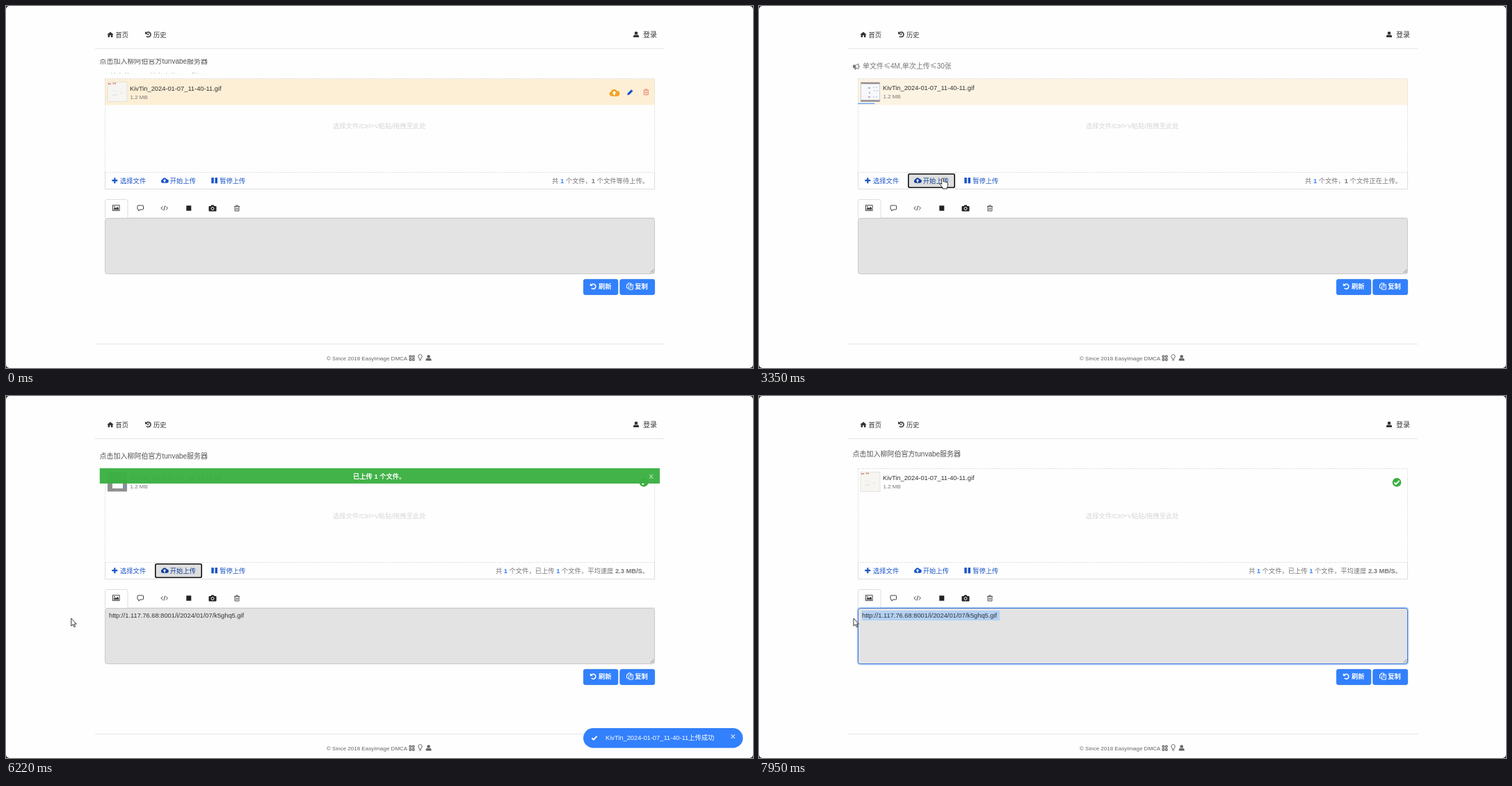
Recreate the animation shown at these times as an HTML page. Size 1074 px wide and 521 px high, loop 8000 ms.

```html
<!DOCTYPE html>
<html lang="zh-CN">
<head>
<meta charset="utf-8">
<title>Upload demo</title>
<style>
html, body { margin: 0; width: 100%; height: 100%; overflow: hidden; background: #2b2b2b; }
svg { display: block; width: 1074px; height: 521px; }
text { font: 9.3px "Liberation Sans", "Noto Sans CJK SC", "Noto Sans CJK", sans-serif; fill: #333; white-space: pre; }
.t10 { font-size: 10px; }
.t8 { font-size: 8px; }
.cjk { font-family: "Noto Sans CJK SC", "Noto Sans CJK", sans-serif; }
.muted { fill: #777; }
.blue { fill: #1a55c8; }
.b { font-weight: 700; }
.num { font-weight: 700; fill: #3280fc; }
.white { fill: #fff; }
.line { fill: none; stroke: #ddd; }
.dash { fill: none; stroke: #ddd; stroke-dasharray: 2 1.5; }
.ico { fill: none; stroke: #444; }
</style>
</head>
<body>
<svg viewBox="0 0 1074 521">
  <defs>
    <clipPath id="tickerClip"><rect x="130" y="76" width="400" height="20.7"/></clipPath>
    <clipPath id="bannerClip"><rect id="bannerBox" x="134.5" y="104" width="805.5" height="0"/></clipPath>
    <g id="user"><circle cy="-2" r="2.3"/><path d="M-4 4V2.6Q-4 .4-1.8 .2Q0 1.4 1.8 .2Q4 .4 4 2.6V4Z"/></g>
    <g id="cloud">
      <path d="M-2.8 4A2.7 2.7 0 0 1-3.3-1.2A3.4 3.4 0 0 1 3-1.6A2.8 2.8 0 0 1 3 4Z"/>
      <path d="M0-1.8L2.3 .7H.8V3H-.8V.7H-2.3Z" fill="#fff"/>
    </g>
    <g id="undo">
      <path d="M-2.8-2A3.5 3.5 0 1 1-2.6 2.4" fill="none" stroke="currentColor" stroke-width="1.5"/>
      <path d="M-4.5-4.5V-.5H-.5Z" fill="currentColor"/>
    </g>
    <path id="bin" d="M-4-2.5H4M-1.4-2.7V-4H1.4V-2.7M-3-2.4V4H3V-2.4M-1-.8V2.6M1-.8V2.6" fill="none" stroke="currentColor"/>
    <path id="tick" d="M-3.6 .2L-1.2 2.6 3.6-2.4" fill="none" stroke="#fff" stroke-width="2"/>
  </defs>

  <rect width="1074" height="521" rx="5" fill="#fefefe"/>

  <!-- header -->
  <path d="M145.3 41.3L150 37.2 154.7 41.3H153.4V45H151V42.3H149V45H146.6V41.3Z" fill="#333"/>
  <text x="157.5" y="44.5">首页</text>
  <use href="#undo" x="204.5" y="41" color="#333"/>
  <path class="ico" d="M204.8 39V41.5H203"/>
  <text x="212" y="44.5">历史</text>
  <use href="#user" x="906" y="41" fill="#333"/>
  <text class="t10" x="916" y="44.7">登录</text>
  <path class="line" d="M128 61.5H947M128 486.5H947" style="stroke:#e5e5e5"/>

  <g clip-path="url(#tickerClip)"><g id="ticker"></g></g>

  <!-- uploader -->
  <rect id="row" x="142" y="105" width="791" height="37.5" fill="#fdefd5"/>
  <path class="dash" d="M142 104.5H933M142.5 105V240M932.5 105V240M142 239.5H933"/>
  <path class="line" d="M142.5 240V263.5H932.5V240"/>
  <g id="thumb">
    <g id="thumbBlank">
      <rect x="146" y="109.5" width="28" height="28" fill="#f6f5f1" stroke="#e2dfd8" stroke-width=".8"/>
      <path d="M147 112H151M153.5 111.5H158" stroke="#d9867d" stroke-width="2.2" stroke-dasharray="2 .6"/>
      <path id="thumbMark" d="M153 122H155M157 123H159M152 128H160M164 125H167" stroke="#cfd8e2" stroke-width=".8"/>
    </g>
    <g id="thumbWindow">
      <rect x="146" y="109.5" width="28" height="28" fill="#f7f8fb"/>
      <path d="M146 111H174M146 136.5H174" stroke="#938d8f" stroke-width="2.6"/>
      <path d="M146.4 110V137M173.6 110V137" stroke="#bbb" stroke-width=".8"/>
      <path d="M164 117H172M165 122H172M164 131H171" stroke="#8fbbe8" stroke-dasharray="2 2"/>
      <path id="thumbDots" d="M155 118H158M156 125H158M155 131H158" stroke="#b98b95" stroke-width="1.3"/>
    </g>
    <g id="thumbDark">
      <rect x="146" y="109.5" width="28" height="28" fill="#8f9090"/>
      <rect x="153" y="124" width="15" height="9" fill="#fff"/>
      <path d="M168 131H172" stroke="#4f97fe" stroke-width="1.4"/>
      <path d="M147 112H173" stroke="#aaa"/>
    </g>
  </g>
  <g id="fileText">
    <text x="178" y="121.7">KivTin_2024-01-07_11-40-11.gif</text>
    <text class="t8 muted" x="178.5" y="134">1.2 MB</text>
  </g>
  <g id="rowIcons">
    <use href="#cloud" transform="translate(874.5 124.5) scale(1.35)" fill="#f1a325"/>
    <path d="M893.2 128.2L893.8 125.4 899 120.2 901.4 122.6 896.1 127.7Z" fill="#1a55c8"/>
    <use href="#bin" x="920.3" y="123.8" color="#ea8573"/>
  </g>
  <rect id="progress" x="142" y="139.7" height="1.4" fill="#65a2fd"/>
  <g id="check">
    <circle cx="917" cy="124.3" r="6.2" fill="#b9b09c"/>
    <circle id="checkGreen" cx="917" cy="124.3" r="6.2" fill="#38b03f"/>
    <use href="#tick" x="917" y="124.3"/>
  </g>
  <text x="470" y="176.3" style="fill:#d5d5d5">选择文件/Ctrl+V粘贴/拖拽至此处</text>

  <rect id="startBg" x="213" y="240" width="70" height="23" fill="#dfdfdf"/>
  <rect id="pauseBg" x="286" y="240" width="67.5" height="23" fill="#ebebeb"/>
  <g id="focusRing" fill="none">
    <rect x="213.4" y="240.4" width="69.2" height="22.2" rx="2.5" stroke="#fefefe" stroke-width="1.2"/>
    <rect x="214.8" y="241.8" width="66.4" height="19.4" rx="2" stroke="#111" stroke-width="1.6"/>
  </g>
  <path d="M152.3 251.2H160.3M156.3 247.2V255.2" stroke="#1a55c8" stroke-width="2.2"/>
  <text class="blue" x="164" y="254.6">选择文件</text>
  <g id="startLabel" class="blue"><use href="#cloud" x="228" y="250.8"/><text x="235.8" y="254.6" style="fill:inherit">开始上传</text></g>
  <g id="pauseLabel" class="blue"><path d="M295.3 247H298.8V255.2H295.3ZM300.5 247H304V255.2H300.5Z"/><text x="307.2" y="254.6" style="fill:inherit">暂停上传</text></g>
  <g text-anchor="end">
    <text id="waiting" class="muted" x="924" y="254.6">共 <tspan class="num">1</tspan> 个文件，<tspan class="b">1</tspan> 个文件等待上传。</text>
    <text id="sending" class="muted" x="924" y="254.6">共 <tspan class="num">1</tspan> 个文件，<tspan class="b">1</tspan> 个文件正在上传。</text>
    <text id="done" class="muted" x="924" y="254.6">共 <tspan class="num">1</tspan> 个文件，已上传 <tspan class="num">1</tspan> 个文件，平均速度 <tspan class="b">2.3 MB/S</tspan>。</text>
  </g>

  <!-- tabs -->
  <path class="line" d="M142.5 305V281Q142.5 278.5 145 278.5H172.5Q175 278.5 175 281V305H933"/>
  <rect class="ico" x="153.5" y="286.8" width="9.6" height="7.6"/>
  <path d="M154.8 293.2V291.5L156.8 289.8 158.3 291 160.3 288.8 162 291V293.2Z" fill="#444"/><circle cx="156" cy="288.8" r=".9" fill="#444"/>
  <path class="ico" d="M190 287H196.5Q197.5 287 197.5 288V292Q197.5 293 196.5 293H193L190.8 295V293H190Q189 293 189 292V288Q189 287 190 287Z"/>
  <path class="ico" d="M225.5 288.3L222.8 291 225.5 293.7M229.8 288.3L232.5 291 229.8 293.7M228.5 287.6L226.8 294.4"/>
  <rect x="259.3" y="287.3" width="7" height="7.4" fill="#222"/>
  <path d="M292.5 288H294.5L295.3 286.5H298.7L299.5 288H301.5Q302.5 288 302.5 289V294.5Q302.5 295.5 301.5 295.5H292.5Q291.5 295.5 291.5 294.5V289Q291.5 288 292.5 288Z" fill="#222"/>
  <circle cx="297" cy="291.5" r="2" fill="#222" stroke="#fff"/>
  <use href="#bin" x="332" y="291" color="#555"/>

  <!-- result box -->
  <g id="halo" fill="none" stroke="#3280fc">
    <rect x="141.5" y="304.5" width="792" height="82" rx="4" opacity=".28"/>
    <rect x="140.5" y="303.5" width="794" height="84" rx="5" opacity=".12"/>
  </g>
  <rect x="142.5" y="305.5" width="790" height="80" rx="3" fill="#e3e3e3" stroke="#c9c9c9"/>
  <rect id="focusLine" x="142.5" y="305.5" width="790" height="80" rx="3" fill="none" stroke="#3474dc"/>
  <path d="M926.5 384L931.5 379M929.5 384L931.5 382" stroke="#777" stroke-width=".8"/>
  <rect id="selection" y="309" height="14" fill="#b3d1f4"/>
  <text id="url" x="148" y="319.2">http://1.117.76.68:8001/i/2024/01/07/k5ghq5.gif</text>

  <rect x="830.4" y="393.4" width="49.4" height="22" rx="2.5" fill="#3280fc" stroke="#2474ee" stroke-width=".8"/>
  <rect x="882.8" y="393.4" width="49.8" height="22" rx="2.5" fill="#3280fc" stroke="#2474ee" stroke-width=".8"/>
  <use href="#undo" x="844.3" y="403.6" color="#fff"/>
  <text class="white b" x="852" y="407">刷新</text>
  <path d="M894.5 401V399H898.5V405.5M894.5 401H892.5V406H895.5M895.7 402.3L897 401H901.3V408H895.7Z" fill="none" stroke="#fff"/>
  <text class="white b" x="904.3" y="407">复制</text>

  <!-- footer -->
  <text class="t8" x="461" y="509.7" style="fill:#666">© Since 2018 EasyImage DMCA</text>
  <path class="ico" d="M580 503.2H582.6V505.8H580ZM584.4 503.2H587V505.8H584.4ZM580 507.6H582.6V510.2H580ZM584.4 507.6H587V510.2H584.4Z"/>
  <path class="ico" d="M594.3 508.3Q594.3 507 593.4 506A2.7 2.7 0 1 1 597.6 506Q596.7 507 596.7 508.3ZM594.2 510H596.8" style="stroke:#666"/>
  <use href="#user" x="607.6" y="506.5" fill="#666"/>

  <!-- notices -->
  <g clip-path="url(#bannerClip)">
    <rect x="134.5" y="104" width="806" height="22" fill="#3bb042" opacity=".96"/>
    <text class="white b" x="499" y="118.6">已上传 1 个文件。</text>
    <text class="b" x="924.6" y="118.6" style="fill:#b4dfb7">X</text>
  </g>
  <g id="toast">
    <rect x="830" y="478" width="229.5" height="28.5" rx="14.2" fill="#3280fc"/>
    <use href="#tick" x="846" y="492"/>
    <text class="white" x="862" y="495.2">KivTin_2024-01-07_11-40-11上传成功</text>
    <path d="M1042.5 487.3L1047.9 492.7M1047.9 487.3L1042.5 492.7" stroke="#c4dbfe" stroke-width="1.3"/>
  </g>

  <g id="cursor" stroke="#222" stroke-width=".9" fill="#fff" stroke-linejoin="round">
    <path id="arrow" d="M0 0V11L2.5 8.7 4.2 12.6 5.9 11.8 4.2 8.1H7.5Z"/>
    <path id="hand" d="M-1.3 .6Q0-1 1.3 .6V5Q2.6 4.4 3.6 5.4Q5 4.9 5.9 6Q7.4 5.8 7.5 7.4V10.5Q7.3 12.5 6.2 13V15H0V13.5L-3.8 8.8Q-4 7-2.6 7.4L-1.3 8.6Z"/>
  </g>
</svg>
<script>
const LOOP = 8000, LINE = 21.5, BANNER = 22;
const $ = Object.fromEntries([...document.querySelectorAll('[id]')].map(e => [e.id, e]));

const invite = '<text class="t10" style="fill:#555" x="134.5" y="0">点击加入柳阿伯官方tunvabe服务器</text>';
const limits = '<path d="M135.5-5H139L143-7V.5L139-1.5H135.5ZM137-1.5L138 1H139.5L138.6-1.5M144-4.5V-2" fill="none" stroke="#777"/>' +
  '<path d="M135.5-5H139V-1.5H135.5Z" fill="#777"/>' +
  '<text class="t10 muted" x="149" y="0">单文件<tspan class="cjk">≤</tspan>4M,单次上传<tspan class="cjk">≤</tspan>30张</text>';
$.ticker.innerHTML = [invite, limits, invite, limits]
  .map((line, i) => `<g transform="translate(0 ${i * LINE})">${line}</g>`).join('');

// time, x, y
const path = [
  [1430, 836, 240], [1650, 843, 285], [1750, 845, 298], [1900, 838, 262], [2090, 832, 230],
  [2230, 740, 236], [2370, 590, 242], [2700, 400, 246], [2950, 290, 250], [3150, 264, 248],
  [4300, 264, 248], [4600, 292, 254], [4750, 309, 259], [5000, 312, 259], [5150, 360, 257],
  [5250, 387, 256], [5450, 640, 290], [5690, 897, 385], [5780, 880, 386], [5840, 875, 385],
  [6050, 420, 352], [6220, 94, 320], [6350, 63, 316], [6500, 100, 322], [6680, 270, 330],
  [6850, 350, 326], [7020, 353, 325], [7300, 353, 325], [7700, 200, 322], [7900, 136, 320]
];

const ramp = (t, a, b) => Math.min(1, Math.max(0, (t - a) / (b - a)));
const swing = (t, a, b) => (1 - Math.cos(Math.PI * ramp(t, a, b))) / 2;
const show = (el, on) => el.setAttribute('opacity', +on);
const move = (el, x, y) => el.setAttribute('transform', `translate(${x} ${y})`);

function cursorAt(t) {
  const i = path.findIndex(k => k[0] > t);
  if (i < 1) return path[i < 0 ? path.length - 1 : 0].slice(1);
  const a = path[i - 1], b = path[i], p = ramp(t, a[0], b[0]);
  return [a[1] + (b[1] - a[1]) * p, a[2] + (b[2] - a[2]) * p];
}

function scrollAt(t) {
  const first = t < 730 ? .326 : .326 + .674 * Math.sin(ramp(t, 730, 1040) * Math.PI / 2);
  return first + swing(t, 4440, 4940) + swing(t, 7835, 8335);
}

function drawThumb(t) {
  const dark = t >= 4300 && t < 6800;
  const blank = t < 1000 || t >= 7520;
  show($.thumbBlank, blank);
  show($.thumbDark, dark);
  show($.thumbWindow, !dark && !blank);
  show($.thumbMark, t > 260 || Math.floor(t / 60) % 2 === 0 ? 1 : .6);
  move($.thumbDots, Math.floor(t / 300) % 3, 0);
}

function drawCursor(t) {
  const [x, y] = cursorAt(t);
  const inBar = t >= 1430 && y > 240 && y < 263;
  const onStart = inBar && x > 213 && x < 283;
  const onPause = inBar && x > 286 && x < 353.5;
  show($.cursor, t >= 1430);
  move($.cursor, x, y);
  show($.hand, onStart || onPause);
  show($.arrow, !onStart && !onPause);

  const focused = t >= 3270 && t < 6980;
  show($.focusRing, focused);
  show($.startBg, focused ? 1 : t >= 6980 ? 1 - ramp(t, 6980, 7180) : onStart ? .6 : 0);
  show($.pauseBg, onPause);
  $.startLabel.style.fill = focused || onStart ? '#123f96' : '';
  $.pauseLabel.style.fill = onPause ? '#123f96' : '';

  const left = Math.min(346, Math.max(148, x));
  $.selection.setAttribute('x', left);
  $.selection.setAttribute('width', t > 7300 ? 346 - left : 0);
}

function drawUpload(t) {
  const started = t >= 3300, finished = t >= 3810;
  show($.row, 1 - ramp(t, 3270, 3500));
  show($.rowIcons, !started);
  move($.fileText, 0, started ? -.7 : 0);
  show($.waiting, !started);
  show($.sending, started && !finished);
  show($.done, finished);
  show($.url, finished);
  show($.check, finished);
  show($.checkGreen, ramp(t, 3880, 4200));
  const part = t < 3870 ? .79 * ramp(t, 3330, 3870) : .79 + .21 * ramp(t, 3870, 4000);
  $.progress.setAttribute('width', 791 * part);
  show($.progress, 1 - ramp(t, 4000, 4150));
}

function drawNotices(t) {
  $.bannerBox.setAttribute('height', BANNER * (swing(t, 3790, 4190) - swing(t, 6675, 7075)));
  const p = ramp(t, 3800, 3890) * (1 - ramp(t, 7780, 7930));
  const s = .88 + .12 * p;
  $.toast.setAttribute('transform', `translate(945 492) scale(${s}) translate(-945 -492)`);
  show($.toast, Math.min(1, p * 1.1));
  const glow = ramp(t, 6980, 7130);
  show($.halo, glow);
  show($.focusLine, glow);
}

function frame(now) {
  const t = now % LOOP;
  move($.ticker, 0, 90.2 - LINE * scrollAt(t));
  drawThumb(t);
  drawCursor(t);
  drawUpload(t);
  drawNotices(t);
  requestAnimationFrame(() => frame(performance.now()));
}
frame(performance.now());
</script>
</body>
</html>
```
